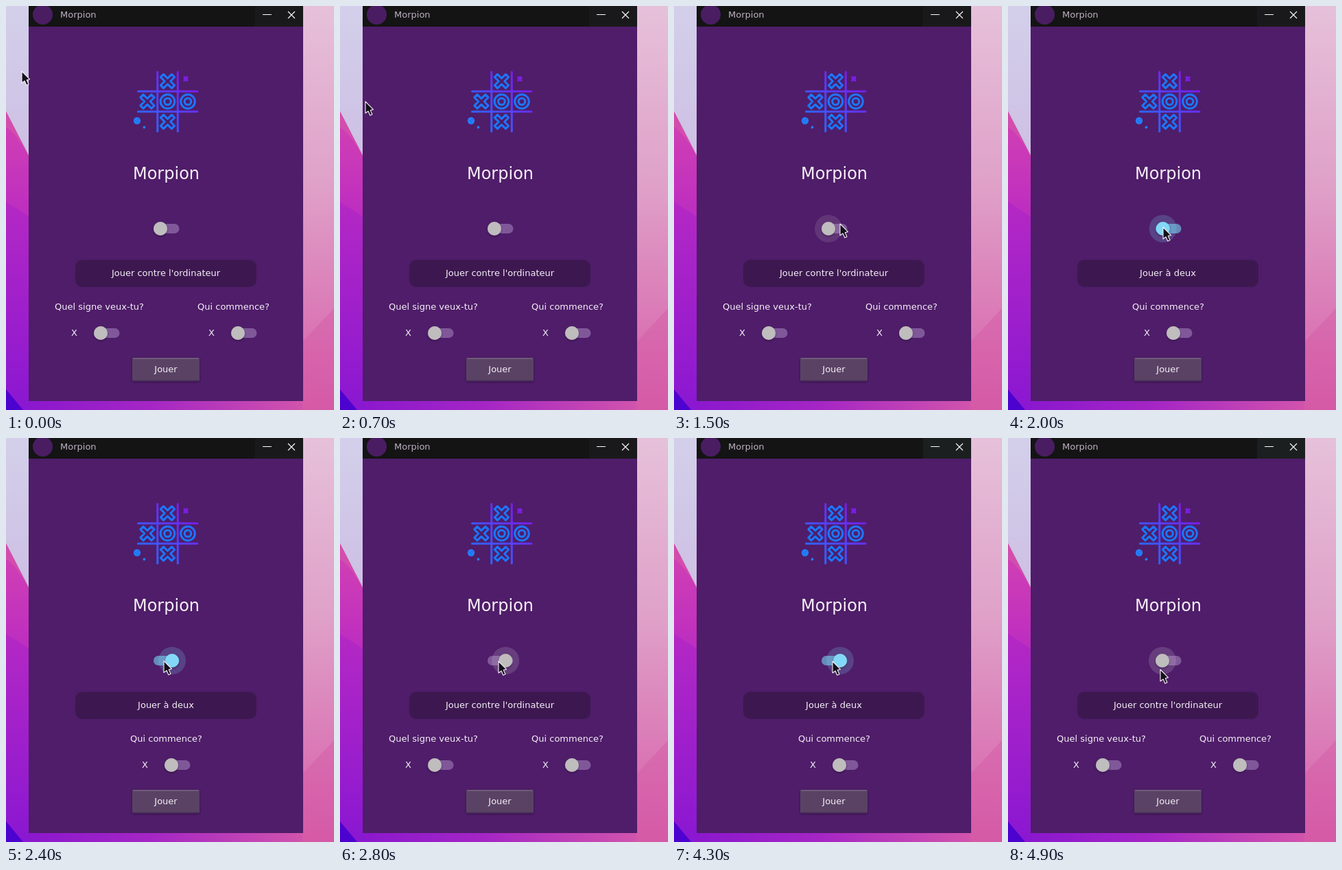
Write an HTML page that moves like this. It is 478 by 588 pixels and loops after 5 s.

```html
<!DOCTYPE html>
<html lang="fr">
<head>
<meta charset="utf-8">
<title>Morpion</title>
<style>
  html, body { margin: 0; width: 100%; height: 100%; overflow: hidden; background: #4f1d69; }
  svg { display: block; width: 478px; height: 588px; }
  text { font-family: "DejaVu Sans", sans-serif; font-size: 13px; fill: #f4eff6; text-anchor: middle; }
  .line { fill: #80589a; }
  .knob { fill: #c0bdbe; }
  .halo { fill: #c9bccb; opacity: 0; }
  .on .line { fill: #658bba; }
  .on .knob, .on .halo { fill: #83d8f8; }
</style>
</head>
<body>
<svg viewBox="0 0 478 588">
  <defs>
    <linearGradient id="sky" x2="0" y2="1">
      <stop stop-color="#d3cfea"/><stop offset="1" stop-color="#cdbfe4"/>
    </linearGradient>
    <linearGradient id="magenta" x2="0" y2="1">
      <stop stop-color="#cf3fb4"/><stop offset="1" stop-color="#bb2bc2"/>
    </linearGradient>
    <linearGradient id="violet" x2="0" y2="1">
      <stop stop-color="#b428c4"/><stop offset="1" stop-color="#8a17d2"/>
    </linearGradient>
    <linearGradient id="floor">
      <stop stop-color="#8b18ce"/><stop offset=".45" stop-color="#a526c4"/><stop offset="1" stop-color="#d254ac"/>
    </linearGradient>
    <linearGradient id="rose" x2="0" y2="1">
      <stop stop-color="#e6c1da"/><stop offset=".45" stop-color="#dfa0c8"/><stop offset="1" stop-color="#d75ea9"/>
    </linearGradient>
    <linearGradient id="ink" gradientUnits="userSpaceOnUse" x1="190" y1="180" x2="268" y2="98">
      <stop stop-color="#1a78ff"/><stop offset=".5" stop-color="#5145fb"/><stop offset="1" stop-color="#8215e4"/>
    </linearGradient>
    <filter id="soft" x="-50%" y="-50%" width="200%" height="200%">
      <feDropShadow dx="0" dy="1.2" stdDeviation="1.4" flood-color="#1c0528" flood-opacity=".45"/>
    </filter>
    <path id="cross" transform="rotate(45)"
      d="M-3-11.4H3V-3H11.4V3H3V11.4H-3V3H-11.4V-3H-3Z"/>
    <g id="ring"><circle r="10.3"/><circle r="4.8"/></g>
  </defs>

  <!-- wallpaper -->
  <rect width="34" height="225" fill="url(#sky)"/>
  <path d="M0 153L34 219V320H0Z" fill="#d34eac"/>
  <path d="M0 176Q20 190 34 222V320H0Z" fill="url(#magenta)"/>
  <path d="M0 285L34 307V588H0Z" fill="url(#violet)"/>
  <rect x="33" y="574" width="401" height="14" fill="url(#floor)"/>
  <path d="M0 558L25 588H0Z" fill="#4d03cf"/>
  <rect x="432" width="46" height="588" fill="url(#rose)"/>
  <path d="M432 489L478 440V588H432Z" fill="#d252a2" opacity=".35"/>

  <!-- window -->
  <rect x="33" width="400" height="575" fill="#4f1d69"/>
  <rect x="33" width="400" height="30" fill="#141414"/>
  <rect id="caption" x="363" width="70" height="30" fill="#19191b"/>
  <circle cx="53.5" cy="12.5" r="14.5" fill="#4a1d63"/>
  <text x="79" y="17" style="text-anchor:start;fill:#bcb2c2">Morpion</text>
  <path d="M374 12.5H387M411 8L421 18M421 8L411 18" stroke="#fff" stroke-width="1.1"/>

  <!-- board -->
  <g fill="none" stroke="url(#ink)" stroke-width="3" stroke-linecap="round" stroke-linejoin="round">
    <path d="M220.8 96V182.500M250.300 96V182.500M192.500 124.200H279M192.500 153.700H279"/>
    <g id="marks"></g>
    <path d="M260 104L264 108M264 104L260 108" stroke="#7c1ee4" stroke-width="3.600"/>
  </g>
  <g fill="#237dfb">
    <circle cx="191" cy="167" r="5.200"/>
    <circle cx="201.500" cy="176.500" r="1.900"/>
  </g>
  <path id="specks" d="M188.500 166.500h1M192 165h1M191 169h1" stroke="#3f3a9a"/>

  <text x="233.500" y="251.500" style="font-size:24px">Morpion</text>
  <rect x="101" y="369.500" width="264" height="39.500" rx="10" fill="#3d1850"/>
  <text id="mode" x="233" y="393"></text>

  <g id="solo">
    <text x="136" y="442">Quel signe veux-tu?</text>
    <text x="331.500" y="442">Qui commence?</text>
    <text x="99.500" y="480">X</text>
    <text x="299.500" y="480">X</text>
  </g>
  <g id="duo">
    <text x="233.500" y="442">Qui commence?</text>
    <text x="202.500" y="480">X</text>
  </g>

  <g filter="url(#soft)">
    <rect x="184" y="512" width="98" height="34" rx="2" fill="#5a4265"/>
    <path d="M185 513H281" stroke="#705a7a" stroke-width="2"/>
    <path d="M185 545H281" stroke="#4c3558" stroke-width="1.500"/>
  </g>
  <text x="233" y="533">Jouer</text>

  <g id="main"></g>
  <path id="cursor" d="M0 0V17L4.200 14L6.800 20.300L10 18.800L7.300 12.700L11.500 11.600Z"
    fill="#15101a" stroke="#f5f0f7" stroke-width="1.100" stroke-linejoin="round"/>
</svg>
<script>
const LOOP = 5000, STEP = 100, SLIDE = 200, TRAVEL = 17;
const $ = id => document.getElementById(id);
const clamp = v => Math.max(0, Math.min(1, v));
const smooth = v => v * v * (3 - 2 * v);

// [time, x, y] of the pointer tip
const route = [
  [0, 23, 95], [600, 36, 137], [700, 37, 139], [1200, 222, 292],
  [1500, 242, 317], [1800, 231, 321], [2000, 226, 322],
  [2500, 231, 325], [4800, 231, 325], [4900, 222, 337], [LOOP, 222, 337]
];
const clicks = [2000, 2800, 3600, 4400];

function toggle(parent, x, y) {
  parent.insertAdjacentHTML('beforeend', `<g transform="translate(${x} ${y})">
    <rect class="line" x="-10" y="-7" width="37.500" height="14" rx="7"/>
    <g class="thumb"><circle class="halo" r="20"/><circle class="knob" r="10" filter="url(#soft)"/></g></g>`);
  return parent.lastElementChild;
}

function mark(shape, x, y) {
  $('marks').insertAdjacentHTML('beforeend', `<use href="#${shape}" x="${x}" y="${y}"/>`);
}

[[235.5, 109.5], [206, 139], [235.5, 168.5]].forEach(p => mark('cross', ...p));
[[235.5, 139], [265, 139]].forEach(p => mark('ring', ...p));
toggle($('solo'), 138, 476);
toggle($('solo'), 338, 476);
toggle($('duo'), 241, 476);
const sw = toggle($('main'), 225, 324);
const thumb = sw.querySelector('.thumb'), halo = sw.querySelector('.halo');

function pointer(t) {
  const i = route.findIndex(p => p[0] > t);
  const [t0, x0, y0] = route[i - 1], [t1, x1, y1] = route[i];
  const k = (t - t0) / (t1 - t0);
  return [x0 + (x1 - x0) * k, y0 + (y1 - y0) * k];
}

function draw(t) {
  const past = clicks.filter(c => c <= t);
  const on = past.length % 2 === 1;
  const p = past.length ? smooth(clamp((t - past.at(-1) + 25) / SLIDE)) : 1;

  sw.setAttribute('class', on ? 'on' : '');
  thumb.setAttribute('transform', `translate(${TRAVEL * (on ? p : 1 - p)} 0)`);
  halo.style.opacity = .2 * clamp((t - 1200) / 400);
  $('mode').textContent = on ? 'Jouer à deux' : "Jouer contre l'ordinateur";
  $('solo').style.display = on ? 'none' : '';
  $('duo').style.display = on ? '' : 'none';
  $('caption').setAttribute('fill', t < 4100 ? '#19191b' : '#1b1f20');
  $('cursor').setAttribute('transform', `translate(${pointer(t)})`);
}

const start = performance.now();
function tick() {
  const t = (performance.now() - start) % LOOP;
  draw(Math.floor(t / STEP) * STEP);
  requestAnimationFrame(tick);
}
tick();
</script>
</body>
</html>
```
